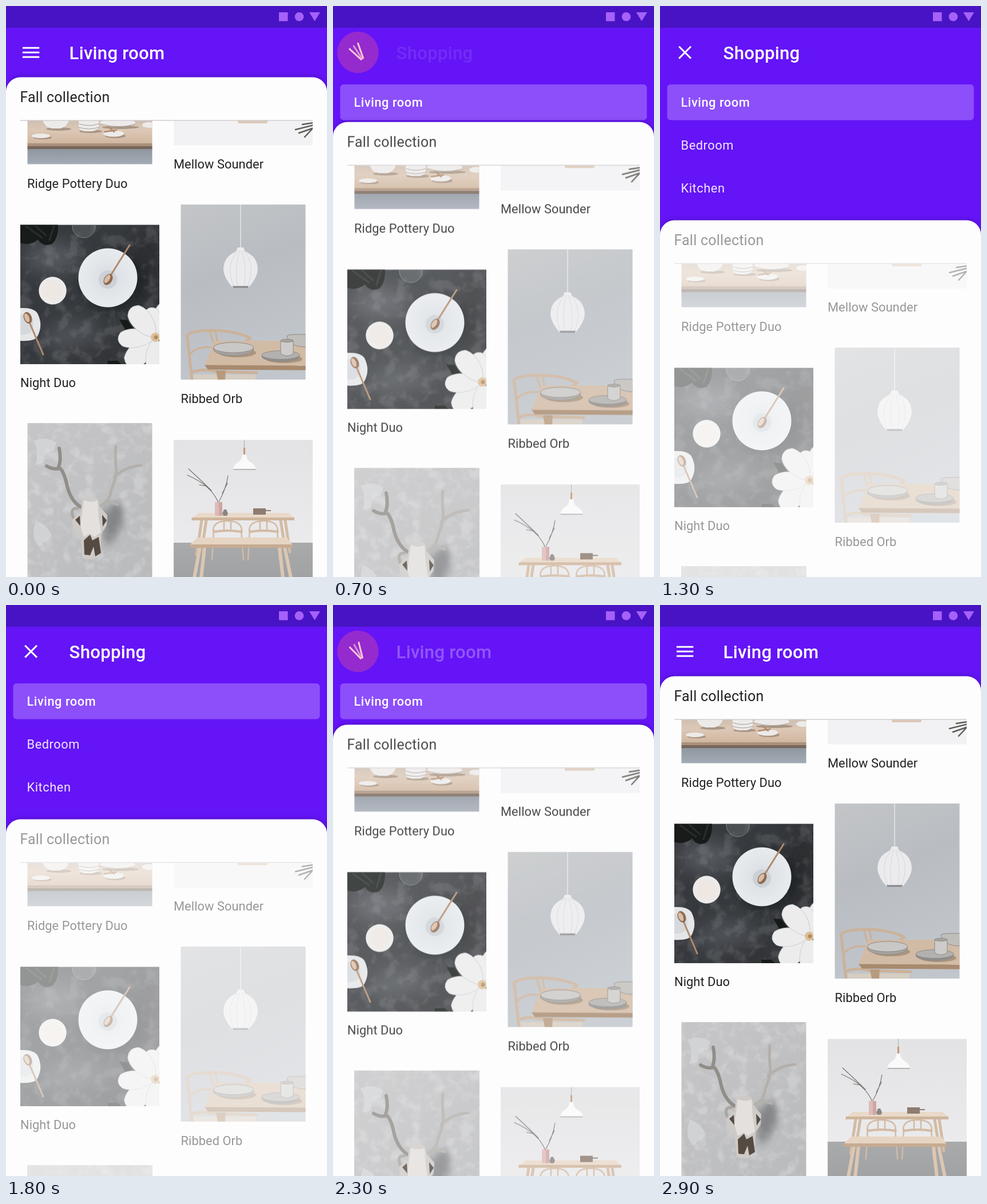
An HTML page for the animation above (3000 ms loop, 561 by 998 pixels).

```html
<!DOCTYPE html>
<html lang="en">
<head>
<meta charset="utf-8">
<title>Backdrop menu</title>
<style>
html, body { margin: 0; height: 100%; overflow: hidden; background: #6414f6; }
#stage { display: block; width: 100vw; height: 100vh; }
text { font: 400 21.8px Roboto, sans-serif; letter-spacing: .08px; fill: #222; }
.title { font-size: 31.2px; font-weight: 500; letter-spacing: .24px; fill: #fff; }
.menu { letter-spacing: .55px; fill: #f1e8ff; }
.heading { font-size: 24.9px; letter-spacing: .28px; }
.line { fill: none; stroke-linecap: round; stroke-linejoin: round; }
.wood { stroke: #d3bba4; }
.gold { stroke: #b08a6c; }
#sheet-card { filter: drop-shadow(0 0 4px #0004); }
</style>
</head>
<body>
<svg id="stage" viewBox="0 0 561 998" preserveAspectRatio="none">
  <defs>
    <filter id="mottle" x="0" y="0" width="1" height="1">
      <feTurbulence type="fractalNoise" baseFrequency=".045" numOctaves="5" seed="4"/>
      <feColorMatrix values="0 0 0 0 1  0 0 0 0 1  0 0 0 0 1  4 0 0 0 -1.9"/>
    </filter>
    <filter id="soft" x="-50%" y="-50%" width="200%" height="200%"><feGaussianBlur stdDeviation="7"/></filter>
    <filter id="haze" x="-50%" y="-50%" width="200%" height="200%"><feGaussianBlur stdDeviation="16"/></filter>
    <linearGradient id="wall" x2=".3" y2="1"><stop stop-color="#c3c5c7"/><stop offset=".45" stop-color="#b9bdc2"/><stop offset="1" stop-color="#c1c6cc"/></linearGradient>
    <linearGradient id="plaster" x2="1" y2="1"><stop stop-color="#c6c6c8"/><stop offset="1" stop-color="#b9babc"/></linearGradient>
    <linearGradient id="room" x2="0" y2="1"><stop stop-color="#e3e2e4"/><stop offset="1" stop-color="#ebebed"/></linearGradient>
    <linearGradient id="floor" x2="0" y2="1"><stop stop-color="#a9aaac"/><stop offset="1" stop-color="#a1a2a4"/></linearGradient>
    <linearGradient id="cabinet" x2="0" y2="1"><stop stop-color="#8f969f"/><stop offset="1" stop-color="#a3abb6"/></linearGradient>
    <linearGradient id="shelf" x2="0" y2="1"><stop stop-color="#cfbfb1"/><stop offset=".4" stop-color="#dcc8b6"/><stop offset="1" stop-color="#cfb59e"/></linearGradient>
    <radialGradient id="plate"><stop stop-color="#d6dbe0"/><stop offset=".4" stop-color="#dfe3e7"/><stop offset="1" stop-color="#e8ebee"/></radialGradient>
    <path id="petal" d="M0 0C-13-9-24-38-15-57Q-5-69 8-60C21-42 14-12 0 0Z"/>
    <g id="chair" class="line wood" stroke-width="2.500">
      <path d="M-25 2Q-24-14 0-14T25 2M-24 2l-3 52M24 2l4 52M-6-14V3H6V-14"/>
      <path d="M-24 5Q0 1 25 5" stroke-width="4"/>
    </g>
  </defs>

  <rect width="561" height="998" fill="#6414f6"/>
  <rect width="561" height="38" fill="#4813c4"/>
  <path d="M477 11h15.500v15.500h-15.500zM530 11h19l-9.500 15.500z" fill="#a661fa"/>
  <circle cx="512.500" cy="18.700" r="7.800" fill="#a661fa"/>

  <g id="icon" fill="#fff">
    <rect id="bar-top" x="-14.700" y="-1.500" width="29.400" height="3"/>
    <rect id="bar-mid" x="-14.700" y="-1.500" width="29.400" height="3"/>
    <rect id="bar-low" x="-14.700" y="-1.500" width="29.400" height="3"/>
  </g>
  <text id="title-closed" class="title" x="110.600" y="93">Living room</text>
  <text id="title-open" class="title" x="110.600" y="93">Shopping</text>

  <rect x="12.500" y="137" width="536" height="62.500" rx="6" fill="#8c4ffa"/>
  <text class="menu" x="36.500" y="176" style="font-weight:500;fill:#fff">Living room</text>
  <text class="menu" x="36.500" y="251">Bedroom</text>
  <text class="menu" x="36.500" y="326">Kitchen</text>

  <g id="sheet">
    <rect id="sheet-card" y="124.600" width="561" height="900" rx="25" fill="#fefdfe"/>
    <g id="content">
      <text class="heading" x="24.400" y="168">Fall collection</text>

      <svg x="37.500" y="200" width="218" height="76.500" viewBox="37.500 200 218 76.500">
        <path d="M37 200h219v42H37z" fill="url(#shelf)"/>
        <path d="M37 240h219v6H37z" fill="#ab917c"/>
        <path d="M37 245h219v6H37z" fill="#77655a"/>
        <path d="M37 250h219v27H37z" fill="url(#cabinet)"/>
        <g fill="#7b6757" opacity=".5">
          <ellipse cx="92" cy="215" rx="22" ry="3"/>
          <ellipse cx="148" cy="219" rx="20" ry="3"/>
          <ellipse cx="200" cy="212" rx="32" ry="3"/>
          <ellipse cx="64" cy="230" rx="16" ry="3"/>
          <ellipse cx="191" cy="227" rx="18" ry="4"/>
        </g>
        <g fill="#edebea">
          <path d="M64 200h46q-4 12-15 14H80q-12-2-16-14z"/>
          <ellipse cx="195" cy="204" rx="31" ry="7"/>
          <ellipse cx="250" cy="208" rx="12" ry="5"/>
          <ellipse cx="61" cy="227" rx="16" ry="4"/>
          <ellipse cx="188" cy="223" rx="18" ry="5.500"/>
          <path d="M127 200h35v12q-4 7-13 7h-10q-9 0-12-7z"/>
        </g>
        <path class="line" d="M128 206q17 6 34 0M127 212q18 6 35 0M165 206q30 9 60 1" stroke="#a59d97"/>
        <path class="line gold" d="M172 220l21-3M181 213l8 7" stroke-width="2.500"/>
      </svg>

      <svg x="293" y="200" width="243" height="43.500" viewBox="293 200 243 43.500">
        <rect x="293" y="200" width="243" height="44" fill="#f2f2f4"/>
        <path d="M404 200h54l-2 5h-50z" fill="#dcc8b6"/>
        <path class="line" d="M538 208l-32 8M538 213l-26 9M535 215l-13 14M538 204l-20 3" stroke="#5c5b55" stroke-width="2.500"/>
      </svg>

      <text x="37" y="318">Ridge Pottery Duo</text>
      <text x="293" y="284">Mellow Sounder</text>

      <svg x="25" y="382.500" width="243" height="243.500" viewBox="25 382.500 243 243.500">
        <rect x="25" y="382" width="243" height="244" fill="#36393d"/>
        <g filter="url(#haze)">
          <ellipse cx="82" cy="440" rx="48" ry="26" fill="#565a60"/>
          <ellipse cx="115" cy="578" rx="50" ry="26" fill="#4f5358"/>
          <ellipse cx="245" cy="465" rx="24" ry="75" fill="#2a2c2f"/>
          <ellipse cx="150" cy="606" rx="50" ry="14" fill="#2d2f32"/>
        </g>
        <rect x="25" y="382" width="243" height="244" filter="url(#mottle)" opacity=".1"/>
        <path d="M25 382h66q1 24-11 34-16 6-24-8-14 12-31 6z" fill="#171b19"/>
        <path class="line" d="M35 385l28 20M50 383l20 18M84 384l-8 25" stroke="#2a2f2a" stroke-width="3"/>
        <circle cx="136" cy="385" r="20" fill="#888d9044" stroke="#7d8386"/>
        <circle cx="185" cy="481" r="54" fill="#111419" opacity=".45" filter="url(#soft)"/>
        <circle cx="178" cy="475" r="51.500" fill="url(#plate)"/>
        <circle cx="178" cy="478" r="16" fill="#cbd1d6"/>
        <circle cx="81.500" cy="497.500" r="24.200" fill="#ecebea"/>
        <circle cx="81.500" cy="497.500" r="17" fill="#eee7e2"/>
        <path d="M20 528q28-2 35 9 11 22-1 42-6 8-34 6z" fill="#e4e6e8"/>
        <path d="M20 539q20-2 27 9 3 15-4 22-7 6-23 4z" fill="#d5d9dd"/>
        <path class="line gold" d="M216 418l-32 51M41 553l24 56" stroke-width="3"/>
        <g fill="#8f6a50">
          <ellipse cx="178.500" cy="478" rx="7" ry="10.500" transform="rotate(32 178.500 478)"/>
          <ellipse cx="38" cy="545" rx="7" ry="10.500" transform="rotate(-22 38 545)"/>
        </g>
        <g fill="#d9bda6">
          <ellipse cx="177" cy="477" rx="4" ry="8" transform="rotate(32 177 477)"/>
          <ellipse cx="36.500" cy="545" rx="4" ry="8" transform="rotate(-22 36.500 545)"/>
        </g>
        <path d="M198 548l14 1 10 14-13 4zM178 620h17l6 6h-24z" fill="#171b18"/>
        <g transform="translate(261 579)" fill="#ececed" stroke="#c4c6c9" stroke-width=".8">
          <use href="#petal" transform="rotate(-132) scale(1.150 1.080)"/>
          <use href="#petal" transform="rotate(183)"/>
          <use href="#petal" transform="rotate(-90) scale(1 1.020)"/>
          <use href="#petal" transform="rotate(22)"/>
          <use href="#petal" transform="rotate(-6) scale(.9 .82)"/>
          <use href="#petal" transform="rotate(-36) scale(1.100 1.040)"/>
          <circle r="8" fill="#dcbf98" stroke="none"/>
          <circle cx="1" r="3.500" fill="#b08b63" stroke="none"/>
        </g>
      </svg>
      <text x="25" y="666">Night Duo</text>

      <svg x="305.500" y="347" width="218" height="306" viewBox="305.500 347 218 306">
        <rect x="305" y="347" width="219" height="306" fill="url(#wall)"/>
        <path d="M410 347v75" stroke="#e5e6e8" stroke-width="1.500"/>
        <path d="M405 422h10l3 7q22 9 22 32-1 14-16 31h-28q-15-17-16-31 0-23 22-32z" fill="#ebebed"/>
        <path class="line" d="M406 428q-24 22-8 63M408 428q-9 30-3 63M412 428q10 30 4 63M415 428q23 22 7 63" stroke="#d6d8da"/>
        <path d="M396 489.500h28l-1 3h-26z" fill="#85868a"/>
        <g class="line" stroke="#cbb29a">
          <path d="M316 577q3-9 40-10 45 0 70 13M317 579l8 76M426 581l-9 7" stroke-width="5"/>
          <path d="M356 568l9 30M366 568l6 30M322 608q14-16 46-10" stroke-width="3.500"/>
          <path d="M326 640q15-7 40-1l72 2" stroke-width="5"/>
        </g>
        <path d="M328 644h108v9H328z" fill="#d5cdc2"/>
        <path d="M364 585h160v44l-177-1z" fill="#d2bba5"/>
        <path d="M347 627.500l177 1v8l-171-1z" fill="#a88a6f"/>
        <path d="M367 637h17l-1 16h-13z" fill="#b89a7e"/>
        <g fill="#7d6550" opacity=".45">
          <ellipse cx="404" cy="606" rx="33" ry="8"/>
          <ellipse cx="486" cy="617" rx="32" ry="7"/>
        </g>
        <g stroke="#8d8984">
          <ellipse cx="397.500" cy="600" rx="35" ry="11" fill="#a6a3a0"/>
          <ellipse cx="397.500" cy="597" rx="35" ry="9" fill="#c9c8c6"/>
          <ellipse cx="480" cy="612.500" rx="33" ry="9" fill="#908d8a"/>
          <ellipse cx="480" cy="610" rx="33" ry="7.500" fill="#b3b1af"/>
          <path d="M491 577q0-3 18-3h16v22q-30 0-34-19z" fill="#c0beba"/>
          <path d="M480 585v23q11 7 22 0v-23z" fill="#cdccca"/>
          <ellipse cx="491" cy="585" rx="11" ry="2.500" fill="#a7a4a0"/>
        </g>
      </svg>
      <text x="305.500" y="694">Ribbed Orb</text>

      <svg x="37.500" y="729" width="218" height="269" viewBox="37.500 729 218 269">
        <rect x="37" y="729" width="219" height="269" fill="url(#plaster)"/>
        <rect x="37" y="729" width="219" height="269" filter="url(#mottle)" opacity=".22"/>
        <path d="M48 760q22-9 40 3l-5 15q-16-1-17 20l-15 5q8-25-3-43zM52 900q18 4 28 25l-22 20q-16-15-6-45z" fill="#dfe0e2" opacity=".55"/>
        <path d="M171 880q28-28 35 5 0 35-31 60l-7-27z" fill="#66676a" opacity=".65" filter="url(#soft)"/>
        <g class="line" stroke="#918e8a" stroke-width="6">
          <path d="M131 876q-20-12-26-45-5-20-13-25 5-14 1-33M94 808q-12 3-23-4"/>
          <path d="M164 874q17-7 20-28 8-19 9-35-3-20-1-41M189 823q20-18 47-20M177 866l18 5" stroke="#b3b0ac" stroke-width="5"/>
          <path d="M125 878q-12-1-9 12t13 18" stroke="#aaa6a0" stroke-width="5"/>
        </g>
        <path d="M134 860q15-5 26 1l4 14 13 15-1 18-9 14-2 38-14 8-17-3-4-42-13-12-2-13 15-13z" fill="#cecbc7"/>
        <path d="M136 864q14 5 24 0l2 30 4 26-12 8-8-6-10 6-6-20z" fill="#e3e0dd"/>
        <path d="M168 889l8 10-7 11zM129 891l-8 7 9 11zM136 934l11-10 4 10 11-6 4 28-10 6-3-17-6 15-10-1z" fill="#564b43"/>
      </svg>

      <svg x="293" y="758.500" width="243" height="240" viewBox="293 758.500 243 240">
        <rect x="293" y="758" width="243" height="182" fill="url(#room)"/>
        <rect x="293" y="938" width="243" height="60" fill="url(#floor)"/>
        <path d="M416.500 758v18" stroke="#aaa"/>
        <path d="M416.500 772v12" stroke="#c39a72" stroke-width="3"/>
        <path d="M413 784h7q0 10 9 14 7 5 8 12h-40q1-8 9-13 7-4 7-13z" fill="#fafafa"/>
        <path d="M397 809h40l-1 2h-38z" fill="#b5b5b7"/>
        <path class="line" d="M371 868q-12-30-54-48M359 847q-18-18-40-38M372 866q12-20 16-45M378 852l9-18M349 839l-11-2" stroke="#76716f" stroke-width="1.200"/>
        <use href="#chair" x="387" y="914"/>
        <use href="#chair" x="450" y="914"/>
        <path class="line wood" d="M342 899l-9 60M350 899l-5 32M480 899l5 32M488 899l8 55" stroke-width="5"/>
        <path d="M337 886h157l10 9H325z" fill="#e9d9c8"/>
        <path d="M325 894h179v5H324z" fill="#cfb59c"/>
        <path d="M365 867h13v24h-13z" fill="#dcbcb8"/>
        <path d="M378 867h-6v24h6z" fill="#d0a5a3"/>
        <path d="M381 880h4l3 7-2 4h-6l-2-4z" fill="#8a8583"/>
        <path d="M432 878h22v11h-22zM454 881h9v2h-9z" fill="#8d7c70"/>
        <path class="line" d="M339 946l-10 54M347 946l-6 54M478 946l6 54M487 946l11 54" stroke="#dcc7b2" stroke-width="6"/>
        <path d="M334 929h157l10 13H321z" fill="#e7d5c3"/>
        <path d="M321 941h180v6H322z" fill="#c6ab92"/>
      </svg>

      <path d="M25 200h511" stroke="#cfced1" stroke-width="1.600"/>
    </g>
  </g>

  <circle id="tap" cx="43.500" cy="81" fill="#f6577f"/>
</svg>
<script>
const LOOP = 3000, STEP = 100, TRAVEL = 250;
const OPEN = { start: 630, length: 250 }, CLOSE = { start: 2215, length: 200 };
const TAPS = [560, 2160];

const el = id => document.getElementById(id);
const set = (id, attrs) => {
  for (const name in attrs) el(id).setAttribute(name, attrs[name]);
};
const clamp = v => Math.min(1, Math.max(0, v));

// cubic-bezier(.4, 0, .2, 1)
function ease(x) {
  let lo = 0, hi = 1;
  for (let i = 0; i < 24; i++) {
    const u = (lo + hi) / 2, v = 1 - u;
    if (1.2 * u * v * v + .6 * u * u * v + u ** 3 < x) lo = u; else hi = u;
  }
  return lo * lo * (3 - 2 * lo);
}

const progress = (t, { start, length }) => clamp((t - start) / length);
const fadeIn = k => clamp((k - .2) / .8);
const fadeOut = k => clamp(1 - k / .2);

function draw(t) {
  const opening = progress(t, OPEN), closing = progress(t, CLOSE);
  const p = closing > 0 ? 1 - ease(closing) : ease(opening);
  const gap = 8 * (1 - p);

  set('sheet', { transform: `translate(0 ${TRAVEL * p})` });
  set('content', { opacity: 1 - .54 * p });
  set('icon', { transform: `translate(43.6 81.2) rotate(${180 * p})` });
  set('bar-top', { transform: `translate(0 ${-gap}) rotate(${45 * p})` });
  set('bar-low', { transform: `translate(0 ${gap}) rotate(${-45 * p})` });
  set('bar-mid', { opacity: 1 - p });
  set('title-closed', { opacity: closing > 0 ? fadeIn(closing) : fadeOut(opening) });
  set('title-open', { opacity: closing > 0 ? fadeOut(closing) : fadeIn(opening) });

  const press = Math.max(...TAPS.map(at => clamp(1.5 - Math.abs(t - at) / 120)));
  set('tap', { r: 37.5 - 4 * press, opacity: press });
}

function tick() {
  const t = performance.now() % LOOP;
  draw(Math.floor(t / STEP) * STEP);
  requestAnimationFrame(tick);
}
tick();
</script>
</body>
</html>
```
